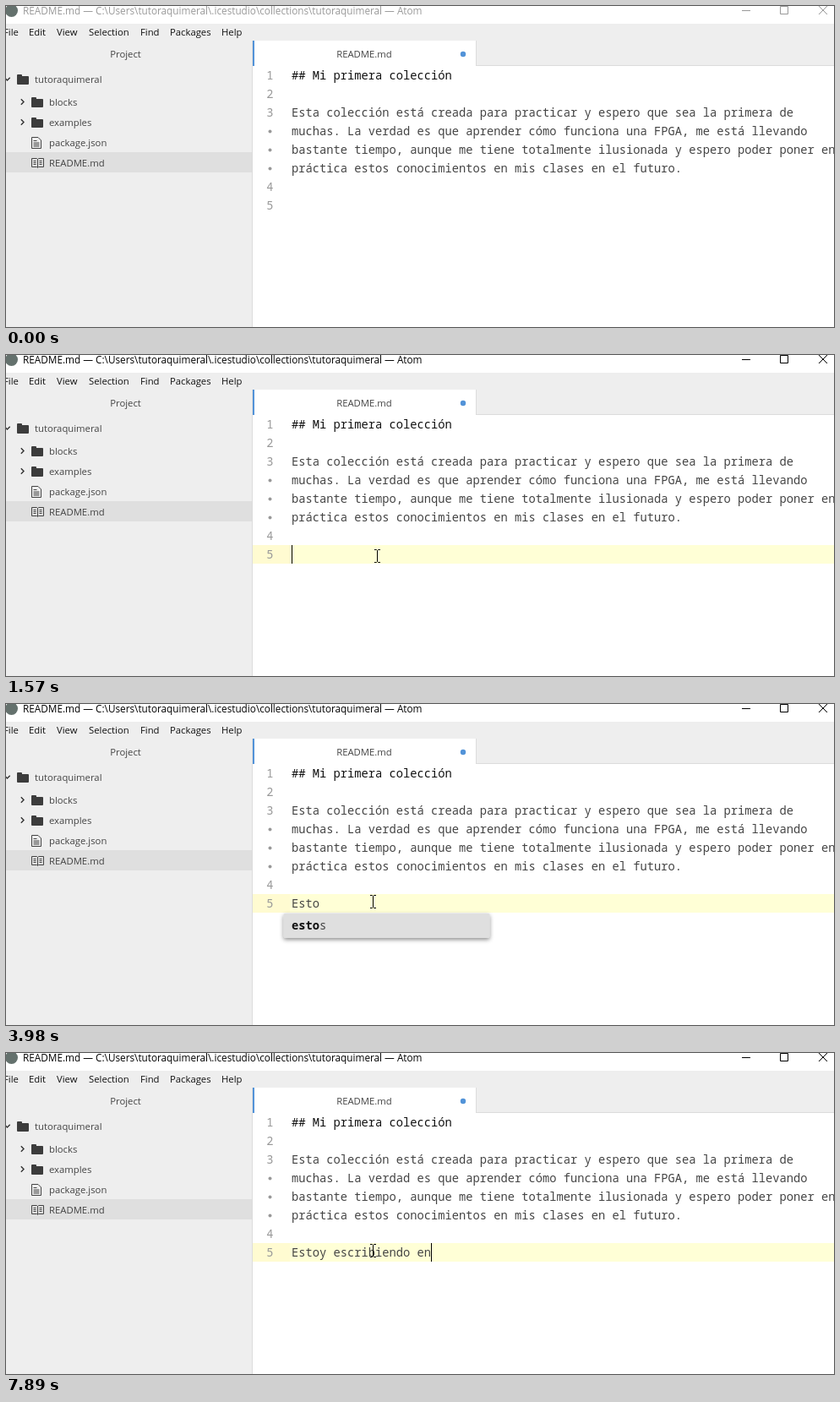
An HTML page that plays this animation: 980x380 px, repeating every 8 s.

```html
<!DOCTYPE html>
<html lang="es">
<head>
<meta charset="utf-8">
<title>Editor</title>
<style>
  html, body { margin: 0; width: 100%; height: 100%; overflow: hidden; background: #fff; }
  svg { display: block; width: 980px; height: 380px; }
  text { white-space: pre; }
  .ui { font: 11.3px "Open Sans", sans-serif; fill: #444; }
  .mid { text-anchor: middle; }
  .menu { fill: #111; }
  .code { font: 13.75px "Noto Sans Mono", monospace; fill: #444; }
  .heading { fill: #111; }
  .num { fill: #999; text-anchor: end; }
  .line { fill: none; stroke: #444; }
  .chrome { color: #999; }
  .chrome.active { color: #000; }
  .chrome text { font-size: 11.75px; fill: currentColor; }
  .chrome path { fill: none; stroke: currentColor; }
  .popup { filter: drop-shadow(0 2px 2.5px rgba(0, 0, 0, .45)); }
  .match { font-weight: 700; fill: #111; }
</style>
</head>
<body>
<svg viewBox="0 0 980 380">
  <defs>
    <path id="folder" fill="#3c3c3c" d="M0 1.5q0-1 1-1h4q1 0 1 1v1h7q1 0 1 1v8q0 1-1 1h-12q-1 0-1-1z"/>
    <path id="chevron" fill="none" stroke="#333" stroke-width="1.4" d="M-1.7-3.2l3.2 3.2l-3.2 3.2"/>
  </defs>
  <rect width="980" height="380" fill="#fff"/>

  <!-- title bar -->
  <circle cx="6.5" cy="5.5" r="7.5" fill="#64716d"/>
  <g id="chrome" class="chrome">
    <text class="ui" x="20" y="10">README.md — C:\Users\tutoraquimeral\.icestudio\collections\tutoraquimeral — Atom</text>
    <path d="M871 5.5h10M916.5 .5h9v9h-9zM962 0l10 10m0-10l-10 10"/>
  </g>

  <!-- menu and tabs -->
  <rect y="21" width="980" height="50" fill="#eee"/>
  <g id="menu"></g>
  <path d="M556 70.5h424" stroke="#dcdcdc"/>
  <rect x="292" y="41" width="264" height="30" fill="#fff"/>
  <path d="M556.5 41v30" stroke="#dcdcdc"/>
  <rect x="292" y="41" width="2" height="30" fill="#5293d8"/>
  <text class="ui mid" x="424" y="61">README.md</text>
  <circle cx="541" cy="57" r="3.2" fill="#5293d8"/>

  <!-- project tree -->
  <rect y="41" width="291" height="339" fill="#eee"/>
  <rect y="173" width="291" height="24" fill="#dfdfdf"/>
  <path d="M291.5 41v339" stroke="#dcdcdc"/>
  <text class="ui mid" x="141.5" y="61">Project</text>
  <use href="#chevron" transform="translate(1.5 86.5) rotate(90)"/>
  <use href="#chevron" x="19.5" y="113.5"/>
  <use href="#chevron" x="19.5" y="137.5"/>
  <use href="#folder" x="13" y="80.5"/>
  <use href="#folder" x="30" y="107.5"/>
  <use href="#folder" x="30" y="131.5"/>
  <path class="line" d="M30.5 155.5h7.5l3.5 3.5v9.5h-11zM32.5 159.5h4m-4 2.5h7m-7 2h7m-7 2h7"/>
  <path class="line" d="M30.5 180.5h6l1 1l1-1h6v10h-6l-1 1l-1-1h-6zM37.5 181v10M32.5 183.5h3m-3 2h3m-3 2h3M39.5 183.5h3m-3 2h3m-3 2h3"/>
  <g id="tree"></g>

  <!-- editor -->
  <g id="row">
    <rect x="292" y="225" width="688" height="22" fill="#ffffd6"/>
    <rect x="292" y="225" width="44" height="22" fill="#fffbd1"/>
  </g>
  <g id="lines"></g>
  <text id="typed" class="code" x="338" y="241"></text>
  <rect id="caret" y="225" width="1" height="22" fill="#000"/>
  <g id="popup"></g>
  <path id="pointer" fill="none" stroke="#000"
        d="M-3.5-7.5h2.5l1 1l1-1h2.5M0-6.5v13M-3.5 7.5h2.5l1-1l1 1h2.5"/>
  <circle id="halo" cx="439.5" cy="239.5" r="12" fill="#ff0" fill-opacity=".53"/>
</svg>
<script>
const $ = id => document.getElementById(id);
const LOOP = 8000, LEFT = 338, ADVANCE = 8.25;
const ACTIVATE = 1340, FOCUS = 1420;

const label = (cls, x, y, str) => `<text class="${cls}" x="${x}" y="${y}">${str}</text>`;

$('menu').innerHTML = [['File', -3], ['Edit', 27], ['View', 60], ['Selection', 98],
  ['Find', 159], ['Packages', 194], ['Help', 255]]
  .map(([str, x]) => label('ui menu', x, 34.5, str)).join('');

$('tree').innerHTML = label('ui', 34, 91, 'tutoraquimeral') +
  ['blocks', 'examples', 'package.json', 'README.md']
    .map((str, i) => label('ui', 51, 118 + 24 * i, str)).join('');

// Wrapped rows have no number and get a dot in the gutter.
$('lines').innerHTML = [
  ['1', '## Mi primera colección'],
  ['2', ''],
  ['3', 'Esta colección está creada para practicar y espero que sea la primera de'],
  ['', 'muchas. La verdad es que aprender cómo funciona una FPGA, me está llevando'],
  ['', 'bastante tiempo, aunque me tiene totalmente ilusionada y espero poder poner en'],
  ['', 'práctica estos conocimientos en mis clases en el futuro.'],
  ['4', ''],
  ['5', '']
].map(([num, str], i) => {
  const y = 87 + 22 * i;
  const gutter = num ? label('code num', 316.5, y, num)
    : `<circle cx="312.5" cy="${y - 4.5}" r="2" fill="#999"/>`;
  return gutter + label(i ? 'code' : 'code heading', LEFT, y, str);
}).join('');

// Moments at which a character of the sentence appears.
const SENTENCE = 'Estoy escribiendo en';
const KEYS = [2580, 2740, 3560, 3680, 4060, 4220, 4380, 4660, 4850, 5080,
  5230, 5390, 5550, 5860, 6010, 6180, 6340, 6550, 6730, 7890];
// Blink toggles; every key press shows the caret again.
const BLINKS = [[FOCUS, 1], [1650, 0], [2030, 1], [2430, 0], [3040, 0], [3440, 1],
  [3980, 0], [7030, 0], [7430, 1], [7810, 0]];
const CARET = [...BLINKS, ...KEYS.map(k => [k, 1])].sort((a, b) => a[0] - b[0]);

// Pointer positions: [time, x, y]
const PATH = [[430, 468, 376], [530, 464, 352], [630, 460, 326], [730, 456, 300],
  [830, 452, 278], [930, 448, 260], [1040, 445, 249], [1140, 443, 243], [1240, 441.5, 240],
  [1570, 439.5, 238], [1650, 436.5, 236], [1730, 434.5, 234]];

const latest = (list, t) => list.filter(e => e[0] <= t).pop();
const show = (id, on) => $(id).setAttribute('visibility', on ? 'visible' : 'hidden');

function popupMarkup(words, typedCount) {
  if (!words.length) return '';
  const items = words.map((w, i) => label('code', LEFT, 267 + 29 * i,
    `<tspan class="match">${w.slice(0, typedCount)}</tspan>${w.slice(typedCount)}`)).join('');
  return `<rect class="popup" x="328.5" y="248" width="244" height="${29 * words.length}" rx="2" fill="#ebebeb"/>` +
    `<rect x="328.5" y="248" width="244" height="29" rx="2" fill="#dfdfdf"/>${items}`;
}

let shownCount = -1;
function setText(count) {
  if (count === shownCount) return;
  shownCount = count;
  $('typed').textContent = SENTENCE.slice(0, count);
  $('caret').setAttribute('x', Math.round(LEFT + count * ADVANCE - 0.01));
  const words = count === 3 ? ['Esta', 'está', 'estos'] : count === 4 ? ['estos'] : [];
  $('popup').innerHTML = popupMarkup(words, count);
}

function draw(t) {
  $('chrome').classList.toggle('active', t >= ACTIVATE);
  show('row', t >= FOCUS);
  show('halo', t >= ACTIVATE && t < FOCUS);
  setText(KEYS.filter(k => k <= t).length);
  const blink = latest(CARET, t), spot = latest(PATH, t);
  show('caret', blink && blink[1]);
  show('pointer', spot);
  if (spot) $('pointer').setAttribute('transform', `translate(${spot[1]} ${spot[2]})`);
}

const start = performance.now();
function tick() {
  draw((performance.now() - start) % LOOP);
  requestAnimationFrame(tick);
}
tick();
</script>
</body>
</html>
```
